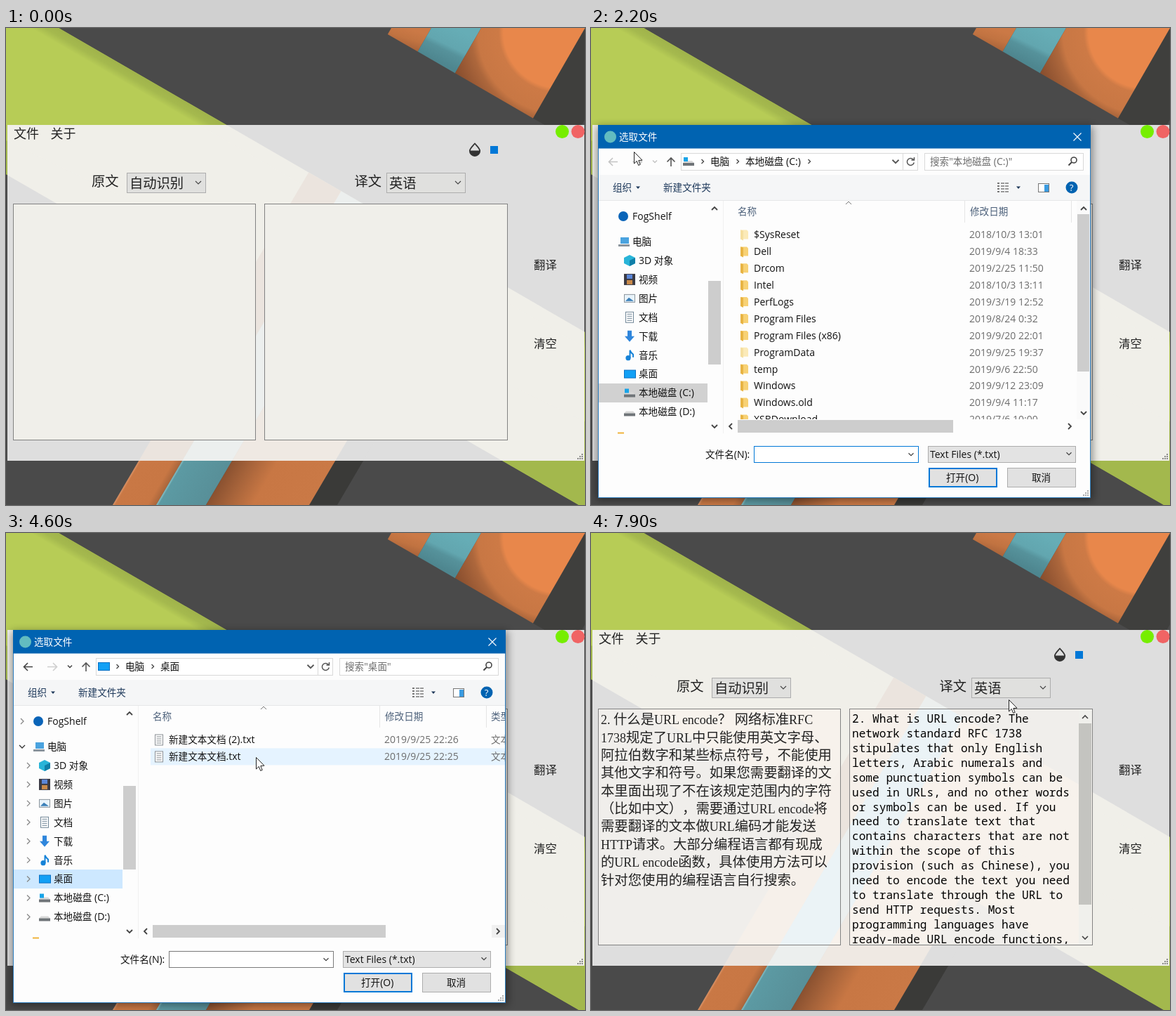
These frames come from a looping animation (825x679 px, 8 s). An HTML page:

```html
<!DOCTYPE html>
<html lang="zh-CN">
<head>
<meta charset="utf-8">
<title>翻译</title>
<style>
html, body { margin: 0; width: 100%; height: 100%; overflow: hidden; background: #4a4a4a; }
svg { display: block; width: 825px; height: 679px; }
text { white-space: pre; text-spacing-trim: space-all; }
.ui { font-family: "Open Sans", "Noto Sans CJK SC", "Noto Sans CJK", sans-serif; }
.kai { font-family: "Liberation Serif", "Noto Sans CJK SC", "Noto Sans CJK", serif; font-weight: 300; }
.mono { font-family: "Noto Sans Mono", monospace; }
#dialog { transform-origin: 361px 403px; animation: dialog 8s linear infinite; }
#cursor { animation: cursor 8s linear infinite; }
@keyframes dialog {
  0%, 23.6% { opacity: 0; transform: scale(.97); }
  23.61%, 23.9% { opacity: .41; transform: scale(.97); }
  26.25%, 74% { opacity: 1; transform: scale(1); }
  76.9%, 100% { opacity: 0; transform: scale(.95); }
}
</style>
</head>
<body>
<svg id="stage" viewBox="0 0 825 679" xmlns="http://www.w3.org/2000/svg"></svg>
<script>
const LOOP = 8000, rules = new Map();
const pct = ms => (ms / LOOP * 100).toFixed(3) + '%';

// Basic shapes
const rect = (x, y, w, h, fill, extra = '') => `<rect x="${x}" y="${y}" width="${w}" height="${h}" fill="${fill}" ${extra}/>`;
const box = (x, y, w, h, fill, stroke, sw = 1) =>
  rect(x + sw / 2, y + sw / 2, w - sw, h - sw, fill, `stroke="${stroke}" stroke-width="${sw}"`);
const poly = (pts, fill, extra = '') => `<polygon points="${pts}" fill="${fill}" ${extra}/>`;
const line = (d, stroke = '#444', w = 1.3) => `<path d="${d}" fill="none" stroke="${stroke}" stroke-width="${w}"/>`;
const disc = (x, y, r, fill) => `<circle cx="${x}" cy="${y}" r="${r}" fill="${fill}"/>`;
const clip = (id, body) => `<g clip-path="url(#${id})">${body}</g>`;
const chev = (x, y, turn = 0, c = '#444', s = 4, w = 1.3) =>
  `<g transform="translate(${x} ${y}) rotate(${turn})">${line(`M${-s} ${-s / 2}L0 ${s / 2}L${s} ${-s / 2}`, c, w)}</g>`;

// Text centred on y; Latin runs get their own size
const text = (x, y, s, { z = 13.6, c = '#111', f = 'ui', k = 1.03, drop = .36 } = {}) =>
  `<text x="${x}" y="${y + z * drop}" font-size="${z}" fill="${c}" class="${f}">` +
  s.replace(/[\x20-\x7e]+/g, m => `<tspan font-size="${(z * k).toFixed(2)}">${m}</tspan>`) + '</text>';
const kai = (x, y, s, z = 19.3) => text(x, y, s, { z, c: '#222', f: 'kai', k: .93, drop: .38 });

// Visible only between two times
function show(from, to, body) {
  const name = `show${from}to${to}`;
  const a = Math.max(0, from - 10), b = to - 10;
  rules.set(name, `@keyframes ${name}{` + (a ? '0%{opacity:0}' : '') + `${pct(a)}{opacity:1}` +
    (to < LOOP ? `${pct(b)}{opacity:0}100%{opacity:0}` : '100%{opacity:1}') + '}');
  return `<g style="animation:${name} 8s step-end infinite">${body}</g>`;
}

// Wallpaper: stripes meet the slanted edges of a dark band
const SLOPE = .577, TILT = .59;
const lowStripe = (a, b, fill) => {
  const top = v => {
    const x = (v + TILT * (679 + 75 * SLOPE)) / (1 + TILT * SLOPE);
    return `${x},${(x - 75) * SLOPE}`;
  };
  return poly(`${a},679 ${top(a)} ${top(b)} ${b},679`, fill);
};
const highStripe = (a, b, fill) => {
  const end = v => { const y = .433 * (v - 528.5); return `${v - SLOPE * y},${y}`; };
  return poly(`${a},0 ${b},0 ${end(b)} ${end(a)}`, fill);
};
const wall = p =>
  rect(0, 0, 825, 679, p.dark) + lowStripe(432, 472, p.shadow) +
  poly('0,0 75,0 825,433 825,684 0,208', p.green) +
  poly('36,0 75,0 825,433 825,455', p.edge) +
  poly('0,208 825,684 825,560 0,160', p.shade) +
  lowStripe(152, 214, p.orange) + lowStripe(214, 285, p.blue) + lowStripe(285, 432, p.wide);

const vivid = { dark: '#4a4a4a', green: '#b7cc56', edge: 'url(#edge)', shade: '#a3b84d', shadow: '#3a3a38',
  orange: 'url(#rust)', blue: 'url(#sea)', wide: 'url(#wide)' };
const pale = { dark: '#dedede', green: '#f0efe9', edge: '#f0efe9', shade: '#f0efe9', shadow: '#dedede',
  orange: '#ebe4de', blue: '#ecefee', wide: '#efe9e3' };
const glass = { dark: '#f0eeeb', green: '#f7f2ec', edge: '#f7f2ec', shade: '#f7f2ec', shadow: '#f0eeeb',
  orange: '#f6f0ea', blue: '#ebf3f6', wide: '#f8f2ec' };

const stops = list => list.map(([o, c]) => `<stop offset="${o}" stop-color="${c}"/>`).join('');
const grad = (id, x1, y1, x2, y2, list) =>
  `<linearGradient id="${id}" gradientUnits="userSpaceOnUse" x1="${x1}" y1="${y1}" x2="${x2}" y2="${y2}">${stops(list)}</linearGradient>`;
const area = (id, x, y, w, h) => `<clipPath id="${id}">${rect(x, y, w, h, '#000')}</clipPath>`;
const defs = '<defs>' +
  grad('edge', 75, 0, 65, 17.3, [[0, '#a0b34b'], [.5, '#a5b94e'], [1, '#b7cc56']]) +
  grad('rust', 152, 679, 198, 706, [[0, '#dc9468'], [.06, '#c97845'], [.8, '#c87744'], [1, '#a9663c']]) +
  grad('sea', 214, 679, 267, 710, [[0, '#8cc4c8'], [.05, '#5c9aa3'], [1, '#588f98']]) +
  grad('wide', 285, 679, 395, 743, [[0, '#8a5130'], [.2, '#a6633a'], [.45, '#c87744'], [1, '#ca7946']]) +
  grad('seaTop', 640, 0, 617, 48, [[0, '#66adb6'], [.5, '#62a6af'], [.65, '#56929b'], [1, '#4e868f']]) +
  grad('rustTop', 570, 0, 562, 26, [[0, '#cb7946'], [.5, '#c17341'], [1, '#a8633a']]) +
  `<radialGradient id="glow" gradientUnits="userSpaceOnUse" cx="788" cy="6" r="165">${stops([[0, '#e8874b'],
    [.48, '#e8874b'], [.52, '#cd7a46'], [.7, '#c87744'], [.76, '#ad673c'], [.86, '#9a5a35'], [1, '#80492b']])}</radialGradient>` +
  area('window', 2, 138, 822, 478) + area('left', 10, 250, 345, 336) + area('right', 368, 250, 346, 335) +
  area('files', 189, 283, 522, 274) + area('panel', 11, 246, 700, 331) + '</defs>';

const sky = wall(vivid) + highStripe(825, 900, '#3f3f3d') + highStripe(549, 606, 'url(#rustTop)') +
  highStripe(606, 677, 'url(#seaTop)') + highStripe(677, 825, 'url(#glow)');

const grip = (x, y, c = '#8a8a8a') => [0, 1, 2].map(i => [0, 1, 2].map(j =>
  i + j > 1 ? rect(x + i * 3, y + j * 3, 2, 2, c) : '').join('')).join('');

// Main window
const combo = (x, s) => box(x, 206, 113, 29, '#e0e0de', '#adadad') + kai(x + 4, 221, s) + chev(x + 102, 220, 0, '#444', 4, 1.1);
const panes = fill => box(10, 250, 346, 337, fill, '#828282') + box(368, 250, 347, 337, fill, '#828282');
const chinese = ['2. 什么是URL encode？ 网络标准RFC', '1738规定了URL中只能使用英文字母、',
  '阿拉伯数字和某些标点符号，不能使用', '其他文字和符号。如果您需要翻译的文', '本里面出现了不在该规定范围内的字符',
  '（比如中文），需要通过URL encode将', '需要翻译的文本做URL编码才能发送', 'HTTP请求。大部分编程语言都有现成',
  '的URL encode函数，具体使用方法可以', '针对您使用的编程语言自行搜索。'];
const english = ['2. What is URL encode? The', 'network standard RFC 1738', 'stipulates that only English',
  'letters, Arabic numerals and', 'some punctuation symbols can be', 'used in URLs, and no other words',
  'or symbols can be used. If you', 'need to translate text that', 'contains characters that are not',
  'within the scope of this', 'provision (such as Chinese), you', 'need to encode the text you need',
  'to translate through the URL to', 'send HTTP requests. Most', 'programming languages have', 'ready-made URL encode functions,'];

const win = clip('window', wall(pale)) +
  show(800, 1700, box(2, 138, 53, 23, '#cce8ff', '#99d1ff')) +
  kai(11, 150, '文件', 18) + kai(63.5, 150, '关于', 18) +
  disc(792.5, 147.5, 9.5, '#76ee00') + disc(815, 147.5, 9.5, '#f06464') +
  '<path d="M668 164.5C672 169 675.2 171.5 675.2 175a7.2 7 0 0 1-14.4 0C660.8 171.5 664 169 668 164.5Z" fill="none" stroke="#333" stroke-width="1.8"/>' +
  '<path d="M661 174.5h14.4a7.2 7.3 0 0 1-14.4 0Z" fill="#333"/>' +
  rect(690, 168, 11, 11, '#0078d7') +
  kai(122, 218, '原文') + combo(172, '自动识别') + kai(496.5, 218, '译文') + combo(542, '英语') +
  kai(752, 337, '翻译', 16.4) + kai(752, 449, '清空', 16.4) +
  panes('#f0efea') +
  show(5950, LOOP, clip('left', wall(glass)) + clip('right', wall(glass)) + panes('none') +
    chinese.map((s, i) => kai(14, 265 + i * 25.35, s, 19.35)).join('')) +
  show(7400, LOOP, clip('right', english.map((s, i) =>
    text(372, 265 + i * 20.9, s, { z: 16.15, c: '#000', f: 'mono', k: 1, drop: .32 })).join('')) +
    rect(695, 251, 18, 334, '#f0f0ec') + rect(695, 271, 18, 258, '#c4c4c0') +
    chev(704, 262, 180, '#444', 4, 1.6) + chev(704, 576, 0, '#444', 4, 1.6)) +
  grip(814, 606) +
  show(1000, 1500, box(2, 161, 170, 78, '#f2f2f2', '#cccccc') +
    show(1200, 1500, rect(5, 163, 164, 24, '#91c9f7')) +
    ['打开', '保存', '退出'].map((s, i) => kai(32, 175 + i * 25, s, 18)).join(''));

// File dialog
const BLUE = '#0063b1', GREY = '#6d6d6d', SOFT = '#c4c4c4';
const disk = (x, y, mark) => poly(`${x},${y + 2} ${x + 3},${y - 1} ${x + 13},${y - 1} ${x + 16},${y + 2}`, '#d9d9d9') +
  rect(x, y + 2, 16, 4, '#6f7478') + (mark ? rect(x + 1, y - 6, 6, 6, '#18a4e8') : '');
const screen = (x, y) => box(x, y - 6, 17, 12, '#12a0f5', '#0a70c4');
const page = (x, y, c = '#8a8f94') => box(x, y - 8, 12, 16, '#fff', c) +
  [0, 1, 2, 3].map(i => rect(x + 2.5, y - 5 + i * 3, 7, 1, c)).join('');
const folder = (y, faint) => poly(`213,${y - 7} 222,${y - 7} 224,${y - 5} 224,${y + 6} 213,${y + 6}`, faint ? '#fbeab8' : '#f7d174') +
  poly(`213,${y - 7} 217,${y - 6} 217,${y + 8} 213,${y + 6}`, faint ? '#f5dfa0' : '#e8b444');

const navY = i => 331 + i * 26.93;
const places = [
  ['3D 对象', y => poly(`47,${y - 4} 55,${y - 8} 63,${y - 4} 63,${y + 4} 55,${y + 8} 47,${y + 4}`, '#28b4d8') +
    poly(`55,${y} 63,${y - 4} 63,${y + 4} 55,${y + 8}`, '#0f7fa8')],
  ['视频', y => rect(47, y - 8, 16, 16, '#3b3b45') + rect(51, y - 7, 8, 6, '#5a86d8') + rect(51, y + 1, 8, 6, '#c98a4a')],
  ['图片', y => box(47, y - 6, 16, 12, '#e8f3fb', '#8b949c') + poly(`49,${y + 4} 54,${y - 1} 61,${y + 4}`, '#3a7fb8')],
  ['文档', y => page(49, y, '#6f8596')],
  ['下载', y => poly(`52,${y - 8} 58,${y - 8} 58,${y} 62,${y} 55,${y + 8} 48,${y} 52,${y}`, '#2f86dc')],
  ['音乐', y => disc(53, y + 4, 3.6, '#1683d8') + line(`M55.5 ${y + 4}V${y - 7}Q57 ${y - 3} 60 ${y - 1}V${y + 3}`, '#1683d8', 2)],
  ['桌面', y => screen(47, y)],
  ['本地磁盘 (C:)', y => disk(47, y, true)],
  ['本地磁盘 (D:)', y => disk(47, y)]
];
const navRow = (i, c) => rect(11, navY(i) - 13.5, 155, 27, c);

const sidebar = show(1990, 3400, navRow(7, '#d1d1d1')) + show(3150, 3400, navRow(6, '#e5f3ff')) +
  show(3400, 4750, navRow(6, '#cde8ff')) + show(4750, LOOP, navRow(6, '#d9d9d9')) +
  disc(46, 268, 7, '#0a64b8') + text(59, 268, 'FogShelf') +
  rect(42, 298, 12, 9, '#4aa3df') + rect(39, 308, 16, 3, '#8b949c') + text(59, 304, '电脑') +
  places.map(([s, icon], i) => icon(navY(i)) + text(68, navY(i), s)).join('') +
  rect(38, 575.5, 9, 2, '#f0b43c') +
  show(3100, 5200, chev(23, 268, -90, '#888') + chev(23, 304, 0, '#333') +
    places.map((_, i) => chev(32, navY(i), -90, '#888')).join('')) +
  chev(176, 257, 180, '#444', 4, 1.8) + chev(176, 567, 0, '#444', 4, 1.8) + rect(167, 360, 18, 119, '#cdcdcd');

const folders = [['$SysReset', '2018/10/3 13:01'], ['Dell', '2019/9/4 18:33'], ['Drcom', '2019/2/25 11:50'],
  ['Intel', '2018/10/3 13:11'], ['PerfLogs', '2019/3/19 12:52'], ['Program Files', '2019/8/24 0:32'],
  ['Program Files (x86)', '2019/9/20 22:01'], ['ProgramData', '2019/9/25 19:37'], ['temp', '2019/9/6 22:50'],
  ['Windows', '2019/9/12 23:09'], ['Windows.old', '2019/9/4 11:17'], ['XSBDownload', '2019/7/6 10:00']];
const rowY = i => 294.5 + i * 23.9;
const row = (i, c, right = 711) => rect(206, rowY(i) - 12, right - 206, 24, c);
const entry = (i, name, date) => text(232, rowY(i), name) + text(539, rowY(i), date, { c: GREY });
const hbar = (w, end) => chev(199, 567, -270, '#444', 4, 1.8) + rect(209, 558, w, 18, '#cdcdcd') + chev(end, 567, -90, '#444', 4, 1.8);

const diskList = clip('files', show(2600, 2740, row(4, '#e5f3ff', 692)) +
    folders.map(([n, d], i) => folder(rowY(i), i % 7 === 0) + entry(i, n, d)).join('')) +
  rect(692, 246, 19, 311, '#fafafa') + rect(693, 265, 17, 224, '#cdcdcd') +
  chev(702, 257, 180, '#444', 4, 1.8) + chev(702, 548, 0, '#444', 4, 1.8) + hbar(307, 682);
const FILE = '新建文本文档.txt';
const deskList = clip('panel', text(691, 261, '类型', { c: '#4c607a' }) +
    show(4300, 4750, row(1, '#e5f3ff')) + show(4750, 5650, row(1, '#cce8ff')) + show(5650, LOOP, row(1, '#d9d9d9')) +
    ['新建文本文档 (2).txt', FILE].map((s, i) => page(212, rowY(i)) + entry(i, s, `2019/9/25 22:2${6 - i}`) +
      text(691, rowY(i), '文本文档', { c: GREY })).join('')) +
  rect(692, 558, 19, 18, '#f0f0f0') + hbar(332, 701);

const back = c => line('M38 190.5H26M31 185l-5.5 5.5L31 196', c, 1.6) + chev(91, 190, 0, c, 3, 1.5);
const crumb = (x, s) => text(x, 190, s);
const address = box(128, 178, 338, 25, '#fff', '#d9d9d9') + rect(444, 178, 1, 25, '#d9d9d9') +
  chev(159, 190, -90, '#444', 3) + crumb(170, '电脑') + chev(209, 190, -90, '#444', 3) +
  chev(434, 190, 0, '#555', 4.5, 1.8) + line('M459.5 187.5a5 5 0 1 0 .8 4M460.5 184v4h-4', '#555', 1.5) +
  line('M59 190.5H72M67 185l5.5 5.5L67 196', '#cfcfcf', 1.6) +
  line('M114 197V185M108.5 190.5l5.5-5.5 5.5 5.5', '#555', 1.6) +
  box(475, 178, 227, 25, '#fff', '#d9d9d9') +
  '<circle cx="688" cy="188" r="4" fill="none" stroke="#444" stroke-width="1.6"/>' + line('M685 191l-4.5 4.5', '#444', 2) +
  show(1990, 3400, back(SOFT) + disk(131, 190, true) + crumb(220, '本地磁盘 (C:)') +
    chev(311, 190, -90, '#444', 3) + text(483, 190, '搜索"本地磁盘 (C:)"', { c: GREY })) +
  show(3400, LOOP, back('#444') + screen(131, 190) + crumb(220, '桌面') + text(483, 190, '搜索"桌面"', { c: GREY }));

const caret = (x, y) => poly(`${x - 3},${y - 1.5} ${x + 3},${y - 1.5} ${x},${y + 2}`, '#1e395b');
const tools = rect(11, 209, 700, 36, '#f5f6f7') + rect(11, 245, 700, 1, '#e6e7e8') +
  text(31, 227, '组织', { c: '#1e395b' }) + caret(67, 227) + text(103, 227, '新建文件夹', { c: '#1e395b' }) +
  [0, 1, 2, 3].map(i => rect(579, 220 + i * 4, 3, 2, '#777') + rect(584, 220 + i * 4, 5, 2, '#999') + rect(590, 220 + i * 4, 5, 2, '#999')).join('') +
  caret(609, 227) + box(637, 221, 16, 13, '#fff', '#777') + rect(646, 223, 6, 10, '#3a9be0') +
  disc(685, 227, 8.5, BLUE) + text(681.7, 227, '?', { c: '#fff', z: 13 });

const head = text(209, 261, '名称', { c: '#4c607a' }) + text(540, 261, '修改日期', { c: '#4c607a' }) +
  chev(367, 249, 180, '#777', 4, 1) + rect(532, 246, 1, 31, '#e5e5e5') + rect(684, 246, 1, 31, '#e5e5e5') + rect(188, 246, 1, 331, '#f0f0f0');

const field = stroke => box(232, 595, 235, 24, '#fff', stroke) + chev(456, 607, 0, '#444', 3.5, 1.2);
const openBtn = c => box(481, 626, 98, 28, c, '#0078d7', 2);
const footer = text(163, 607, '文件名(N):') + show(1990, 3400, field('#0078d7')) + show(3400, LOOP, field('#7a7a7a')) +
  show(4750, 5650, text(235, 607, FILE)) +
  show(5650, LOOP, rect(234, 597, 103, 19, '#0078d7') + text(235, 607, FILE, { c: '#fff' })) +
  box(480, 595, 211, 24, '#e3e3e3', '#adadad') + text(483, 607, 'Text Files (*.txt)') + chev(681, 606, 0, '#444', 3.5, 1.2) +
  openBtn('#e1e1e1') + show(5200, LOOP, openBtn('#e5f1fb')) + show(5650, LOOP, box(481, 626, 98, 28, '#cce4f7', '#0062b1')) +
  text(506, 640, '打开(O)') + box(593, 626, 98, 28, '#e1e1e1', '#adadad') + text(628, 640, '取消') + grip(701, 658, '#aaa');

const title = rect(10, 138, 702, 33.5, BLUE) +
  show(1880, 5700, disc(27.5, 155, 8.5, '#62bcc0') + text(40, 155, '选取文件', { c: '#fff' }) + line('M687.5 149.5l11 11M698.5 149.5l-11 11', '#fff', 1.1)) +
  show(5700, LOOP, rect(10, 138, 702, 33.5, '#0a68b4') + text(18, 155, '选取文件', { c: '#fff' }));

const blank = rect(167, 246, 18, 331, '#e6e6e6') + rect(167, 246, 18, 18, '#f5f5f5') + chev(176, 257, 180, '#444', 4, 1.8) +
  chev(176, 567, 0, '#444', 4, 1.8) + rect(693, 265, 17, 224, '#e0e0e0') + rect(209, 558, 307, 18, '#cdcdcd');

const dialog = '<g id="dialog">' +
  show(1990, LOOP, rect(8, 140, 707, 532, '#000', 'style="filter:blur(6px)" opacity=".4"')) +
  box(10, 138, 702, 531, '#fdfdfd', '#2f7fc0') + title + show(1880, 1990, blank) +
  show(1990, LOOP, address + tools + head + sidebar + show(1990, 3400, diskList) + show(3400, LOOP, deskList) + footer) + '</g>';

// Pointer: time, x, y
const path = [[0, 366, 281], [100, 366, 281], [400, 200, 215], [800, 40, 158], [1000, 30, 153], [1400, 61, 176],
  [2400, 61, 176], [2600, 250, 385], [2720, 240, 400], [2900, 173, 434], [3200, 104, 488], [3500, 104, 488],
  [4200, 335, 328], [4300, 356, 319], [4800, 356, 319], [5250, 533, 652], [5500, 533, 638], [5900, 533, 638],
  [6200, 562, 400], [6500, 818, 342], [6800, 775, 325], [7100, 798, 345], [7300, 785, 338], [7850, 595, 237], [8000, 595, 237]];
const cursor = show(100, LOOP, '<g id="cursor">' +
  poly('.5,.5 .5,17 4.3,13.4 6.7,19.4 9.2,18.4 6.8,12.5 12,12.2', '#fff', 'stroke="#222" stroke-width="1"') + '</g>');
rules.set('cursor', '@keyframes cursor{' + path.map(([t, x, y]) => `${pct(t)}{transform:translate(${x}px,${y}px)}`).join('') + '}');

const sheet = document.createElement('style');
sheet.textContent = [...rules.values()].join('\n');
document.head.append(sheet);
document.getElementById('stage').innerHTML = defs + sky + win + dialog + cursor;
</script>
</body>
</html>
```
